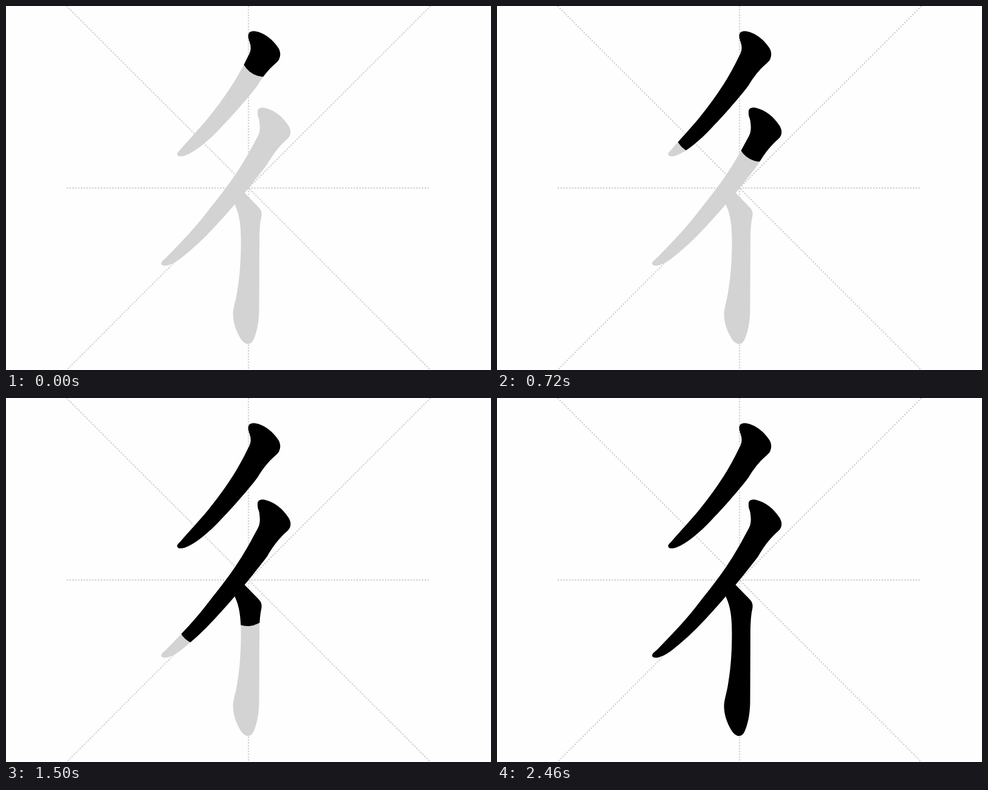
An HTML page with a canvas for the animation above (2.52 s loop, 800 by 600 pixels).

```html
<!DOCTYPE html>
<html>
<head>
<meta charset="utf-8">
<style>
  html, body { margin: 0; width: 100%; height: 100%; overflow: hidden; background: #fefefe; }
  canvas { display: block; }
</style>
</head>
<body>
<canvas id="stage" width="800" height="600"></canvas>
<script>
const ctx = document.getElementById('stage').getContext('2d');
const LOOP = 2520, STEP = 60, BRUSH = 75;
const DOT = 600 / 256; // the guides live on a 256-unit grid
const GUIDES = new Path2D('M400 0V600M100 300H700M100 0L700 600M700 0L100 600');

// shape: outline; spine: brush path clipped by the outline;
// start in ms, lead = spine length already covered at start, speed in px/ms
const strokes = [
  {
    shape: `M399 49C399 42 404 40.5 410 41C428 44 442 58 449 69C453 76 452.5 83 449 89
      C444 96 433 100 414 131C409 138 382 171 353 201C333 222 313 239 295 246
      C289 248 283 248 282 244.5C281 241 285 239 289 234C301 220 319 201 333 184
      C358 153 377 125 392 96L400 80C405 71 403 64 401 58C400 55 399 52 399 49Z`,
    spine: 'M416 52L425 78.6Q402 122 366 165.8Q349 186 331 204.5L284 250',
    start: 0, lead: 28.1, speed: 0.22
  },
  {
    shape: `M414.5 176C414 168 418 166.5 425 167C444 171 457 184 465 196C470 203 470 211 466 216
      C461 222 448 230 430 261C423 270 390 313 357 349C338 370 321 388 304 402
      C290 414 278 424 266 427C260 428.5 255 427 255.5 423.5C256 420 260 418 265 413
      L289 388C306 370 321 353 336 333C365 297 383 272 402 238L415 214
      C420 205 418 194 417 187C415.5 182 414.5 180 414.5 176Z`,
    spine: 'M430 180L434 218.5Q405 267 367.8 313Q346 341 321 368.7L265 429',
    start: 720, lead: 38.7, speed: 0.242
  },
  {
    shape: `M392.5 307L416 331C421 336 422 341 420.5 348C418 359 417.5 375 417.5 390L417 500
      C417 520 413 538 408 549C405 555 402 556.5 398 556.5C393 556 389 552 386 547
      C378 534 374 520 374 507C374 497 379 484 381 469C386 440 387 410 387 388
      C387 362 385 344 377 327L370 316Z`,
    spine: 'M384 310L398 338Q405.5 388 402.2 438L396 560',
    start: 1500, lead: 31.3, speed: 0.208
  }
].map(s => ({ ...s, shape: new Path2D(s.shape), spine: new Path2D(s.spine) }));

function drawGuides() {
  ctx.strokeStyle = '#d3d3d3';
  ctx.lineWidth = DOT;
  ctx.lineCap = 'butt';
  ctx.setLineDash([DOT, DOT]);
  ctx.stroke(GUIDES);
}

function brush({ shape, spine, start, lead, speed }, time) {
  if (time < start) return;
  ctx.save();
  ctx.clip(shape);
  ctx.strokeStyle = '#000';
  ctx.lineWidth = BRUSH;
  ctx.lineCap = ctx.lineJoin = 'round';
  ctx.setLineDash([lead + speed * (time - start), 9999]);
  ctx.stroke(spine);
  ctx.restore();
}

function draw(now) {
  const time = Math.floor(now % LOOP / STEP) * STEP;
  ctx.fillStyle = '#fefefe';
  ctx.fillRect(0, 0, 800, 600);
  drawGuides();
  ctx.save();
  ctx.translate(0.5, 0.5); // glyph points are pixel centres
  ctx.fillStyle = '#d3d3d3';
  strokes.forEach(s => ctx.fill(s.shape));
  strokes.forEach(s => brush(s, time));
  ctx.restore();
  requestAnimationFrame(draw);
}
requestAnimationFrame(draw);
</script>
</body>
</html>
```
